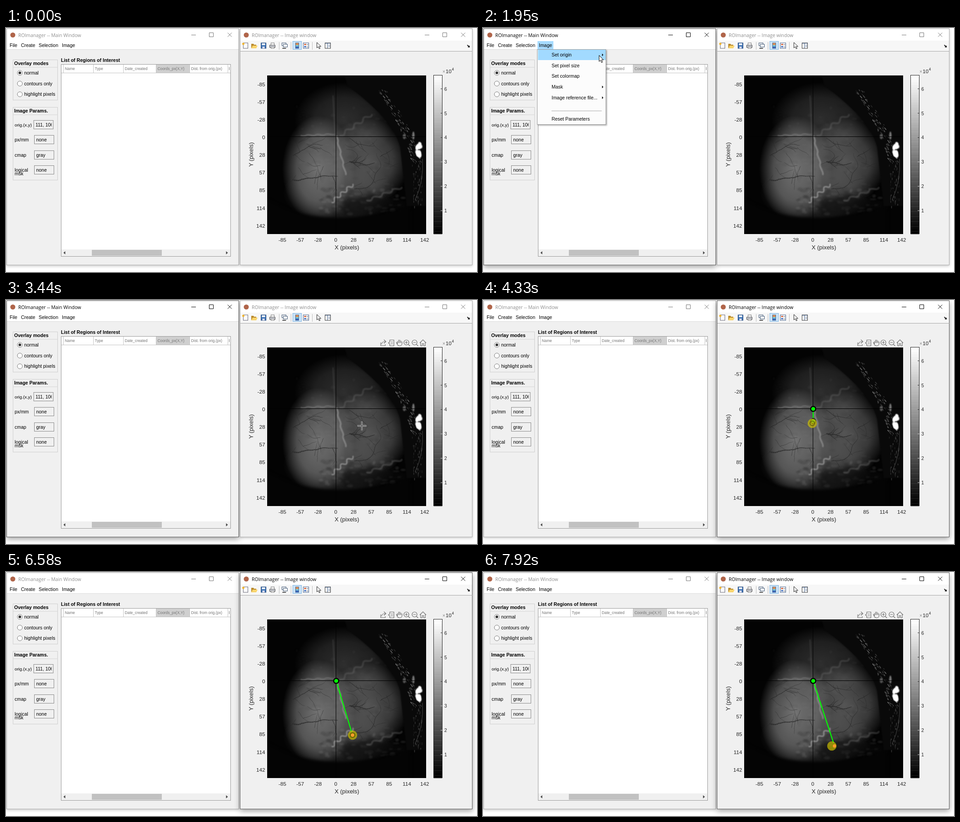
An HTML page with a canvas for the animation above (7990 ms loop, 1037 by 540 pixels).

```html
<!DOCTYPE html>
<html lang="en">
<head>
<meta charset="utf-8">
<title>ROImanager</title>
<style>
html, body { margin: 0; width: 100%; height: 100%; overflow: hidden; background: #fff; }
svg, canvas { position: absolute; left: 0; top: 0; }
#photo { left: 575px; top: 105px; }
text { font: 10.45px "Liberation Sans", Arial, sans-serif; white-space: pre; }
.title { font: 10.35px "Open Sans", "Noto Sans", sans-serif; fill: #8e8e8e; }
.bold { font-weight: bold; font-size: 10.55px; }
.head { font-size: 8.35px; fill: #747474; }
.tick { font-size: 11.7px; fill: #262626; }
.small { font-size: 10.5px; fill: #262626; }
.label { font-size: 13px; fill: #262626; }
.mid { text-anchor: middle; }
.end { text-anchor: end; }
.frame { filter: drop-shadow(0 2px 3px rgba(0,0,0,.22)); }
.edge { fill: none; stroke: #ababab; }
.buttons { fill: none; stroke: #777; }
.active .frame { filter: drop-shadow(0 4px 6px rgba(0,0,0,.38)); }
.active .edge { stroke: #5c5c5c; }
.active .title { fill: #000; }
.active .buttons { stroke: #000; }
.menu { filter: drop-shadow(2px 2px 1.5px rgba(0,0,0,.3)); }
</style>
</head>
<body>
<svg id="back" width="1037" height="540"></svg>
<canvas id="photo" width="350" height="351"></canvas>
<svg id="front" width="1037" height="540"></svg>
<script>
const LOOP = 7990, STEP = 70;
const back = document.getElementById('back'), front = document.getElementById('front');

function add(parent, tag, attrs, content) {
  const el = document.createElementNS('http://www.w3.org/2000/svg', tag);
  for (const k in attrs) el.setAttribute(k, attrs[k]);
  if (content !== undefined) el.textContent = content;
  parent.appendChild(el);
  return el;
}
const group = (p, cls) => add(p, 'g', { class: cls || '' });
const text = (p, x, y, s, cls, more) => add(p, 'text', { x, y, class: cls || '', ...more }, s);
const rect = (p, x, y, width, height, fill, stroke) =>
  add(p, 'rect', { x, y, width, height, fill: fill || 'none', stroke: stroke || 'none' });
const line = (p, d, stroke, w) =>
  add(p, 'path', { d, fill: 'none', stroke, 'stroke-width': w || 1 });
const shape = (p, d, fill, stroke) => add(p, 'path', { d, fill, stroke: stroke || 'none' });
const disk = (p, cx, cy, r, fill, stroke, w) =>
  add(p, 'circle', { cx, cy, r, fill: fill || 'none', stroke: stroke || 'none', 'stroke-width': w || 1 });
const show = (el, on) => el.setAttribute('display', on ? 'inline' : 'none');
const place = (el, x, y) => el.setAttribute('transform', `translate(${x} ${y})`);

// ---- windows ----
function makeWindow(x, title, barHeight, barFill) {
  const g = group(back), r = x + 512;
  add(g, 'rect', { class: 'frame', x, y: 1, width: 512, height: 524, fill: '#f0f0f0' });
  rect(g, x, 1, 512, 27, '#fff');
  rect(g, x, 28, 512, barHeight, barFill);
  disk(g, x + 14, 15.5, 5.5, '#b0654a');
  text(g, x + 26, 19.5, title, 'title');
  add(g, 'path', {
    class: 'buttons',
    d: `M${r - 105} 15.5h10M${r - 65.5} 10.5h9v9h-9zM${r - 25} 10.5l9 9m0-9l-9 9`
  });
  add(g, 'rect', { class: 'edge', x: x + .5, y: 1.5, width: 511, height: 523 });
  return g;
}
const mainWin = makeWindow(1, 'ROImanager -- Main Window', 19, '#fff');
const imageWin = makeWindow(515, 'ROImanager -- Image window', 23, '#f7f7f7');

// ---- main window ----
const menuMark = rect(mainWin, 120, 29, 35, 18, '#a6dbff');
const menuBar = { File: 8, Create: 33, Selection: 72, Image: 123 };
for (const s in menuBar) text(mainWin, menuBar[s], 41.5, s);
line(mainWin, 'M2 47.5H512', '#dcdcdc');

function panel(y, h, title) {
  rect(mainWin, 15.5, y + .5, 98, h, 'none', '#cfcfcf');
  line(mainWin, `M16 ${y + 17}H113`, '#d4d4d4');
  text(mainWin, 18, y + 12, title, 'bold');
}
panel(70, 89, 'Overlay modes');
['normal', 'contours only', 'highlight pixels'].forEach((s, i) => {
  const y = 99.3 + i * 23.7;
  disk(mainWin, 30.5, y, 5.5, '#fff', '#777');
  if (!i) disk(mainWin, 30.5, y, 3, '#333');
  text(mainWin, 40, y + 3.5, s);
});
panel(175, 161, 'Image Params.');
add(add(back, 'clipPath', { id: 'field' }), 'rect', { x: 61, y: 200, width: 39.5, height: 130 });
[['orig.(x,y)', '111, 106'], ['px/mm', 'none'], ['cmap', 'gray'], ['logical', 'none']].forEach(([name, value], i) => {
  const y = 204 + i * 33.3, x = i ? 62 : 60.5;
  text(mainWin, 19, Math.round(y) + 13.5, name, '', i ? {} : { style: 'font-size:9.7px' });
  rect(mainWin, x + .5, Math.round(y) + .5, 43, 19, '#f0f0f0', '#8a8a8a');
  text(mainWin, x + 4.5, Math.round(y) + 13.5, value, '', { 'clip-path': 'url(#field)' });
});
text(mainWin, 19, 326, 'msk');

text(mainWin, 121, 74.5, 'List of Regions of Interest', 'bold');
rect(mainWin, 121.5, 80.5, 373, 425, '#fff', '#9a9a9a');
rect(mainWin, 330, 81, 74, 18, '#cfcfcf');
line(mainWin, 'M122 99.5H494M488.5 81V99', '#c4c4c4');
const columns = { 'Name': 126, 'Type': 192, 'Date_created': 258, 'Coords_px(X,Y)': 330, 'Dist. from orig.(px)': 404 };
for (const s in columns) {
  line(mainWin, `M${columns[s] + .5} 81V99`, '#c4c4c4');
  text(mainWin, columns[s] + 3.5, 92.5, s, 'head');
}
line(mainWin, 'M491.5 86.5V93', '#777');
rect(mainWin, 122, 490, 372, 15, '#f0f0f0');
rect(mainWin, 189, 491, 154, 13, '#c1c1c1');
shape(mainWin, 'M126.5 497.5l4-3.5v7zM488.5 497.5l-4-3.5v7z', '#444');

// ---- image window toolbar ----
const ARROW = 'M.5.5V14l3.1-2.8 2.2 5.2 2.3-1-2.2-5H10z';
line(imageWin, 'M516 51.5H1027', '#a5a5a5');
[601, 627, 674].forEach(x => line(imageWin, `M${x}.5 31V48`, '#bdbdbd'));
rect(imageWin, 631.5, 29.5, 19, 18, '#cce4f7', '#7eb4e2');
function icon(x, draw) {
  const g = group(imageWin);
  place(g, x, 39);
  draw(g);
}
icon(526.5, g => {
  rect(g, -4, -6, 10, 12, '#fff', '#667');
  disk(g, -4, -4, 2.5, '#f2b632');
});
icon(546, g => {
  shape(g, 'M-6-4h5l1 2h5v8h-11z', '#b98a2c');
  shape(g, 'M-3 0H8L5 6H-6z', '#f9d56e');
});
icon(566.5, g => {
  rect(g, -5, -6, 11, 12, '#3f74b5', '#24487c');
  rect(g, -3, -5, 7, 4, '#fff');
  rect(g, -2, 2, 5, 4, '#dde');
});
icon(586.5, g => {
  rect(g, -3, -6, 7, 6, '#fff', '#777');
  rect(g, -6, -1, 12, 5, '#c9ccd4', '#555');
  rect(g, -3, 3, 7, 3, '#fff', '#777');
});
icon(613.5, g => {
  [-6, -3].forEach(k => rect(g, k, k, 9, 6, '#fff', '#3c5472'));
  line(g, 'M-5 6h8', '#555', 2);
});
icon(640.5, g => {
  rect(g, -3, -6, 7, 12, '#78c8d8', '#44618a');
  rect(g, -2.5, -5.5, 6, 4, '#e58b4b');
  rect(g, -2.5, 2, 6, 4, '#3b66b8');
});
icon(660.5, g => {
  rect(g, -6, -6, 12, 12, '#fff', '#44618a');
  rect(g, -4, -4, 4, 3, '#d6613b');
  rect(g, -4, 1, 4, 3, '#3b66b8');
  line(g, 'M1-2h4M1 3h4', '#555');
});
icon(684.5, g => shape(g, 'M0-7v12l3-2.6 2 4.6 2-.8-2-4.4h4z', '#fff', '#222'));
icon(708.5, g => {
  rect(g, -6, -6, 12, 12, '#fff', '#333');
  line(g, 'M-6-5h12M-1-5v11M1-1h4M1 2h4', '#44618a');
});
icon(1019, g => shape(g, 'M-3-2l4 3 1-2v5h-5l2-1-3-4z', '#222'));

// ---- axes and colour bar ----
const ticks = Array.from({ length: 9 }, (_, i) => i - 3);
for (const k of ticks) {
  const value = Math.round(k * 28.4);
  text(imageWin, 726 + k * 39.15, 472.5, value, 'tick mid');
  text(imageWin, 570.5, 246 + k * 39.15, value, 'tick end');
}
text(imageWin, 750.5, 489.5, 'X (pixels)', 'label mid');
text(imageWin, 0, 0, 'Y (pixels)', 'label mid', { transform: 'translate(543.5 280) rotate(-90)' });
for (let i = 0; i < 64; i++) {
  const v = Math.round(255 * (1 - i / 63));
  rect(imageWin, 942, 104 + i * 5.5, 18, 5.8, `rgb(${v},${v},${v})`);
}
rect(imageWin, 941.5, 104.5, 19, 351, 'none', '#262626');
for (let n = 1; n <= 6; n++) {
  text(imageWin, 965, 462 - n * 53.9, n, 'small');
  line(imageWin, `M957 ${458 - n * 53.9}h3.5`, n > 3 ? '#333' : '#ddd');
}
text(imageWin, 961, 99.5, '×', 'small', { style: 'fill:#888' });
text(imageWin, 968, 99.5, '10', 'small', { style: 'font-size:11.5px' });
text(imageWin, 981.5, 93.5, '4', 'small', { style: 'font-size:8.5px' });

// ---- camera picture: soft tones, wandering vessels ----
function paintPhoto() {
  const g = document.getElementById('photo').getContext('2d');
  let seed = 11;
  const rnd = () => (seed = seed * 16807 % 2147483647) / 2147483647;
  const span = (a, b) => a + (b - a) * rnd();
  const gray = (v, a) => `rgba(${v},${v},${v},${a})`;
  const blur = n => { g.filter = n ? `blur(${n}px)` : 'none'; };
  function glow(x, y, rx, ry, v, a) {
    g.save();
    g.translate(x, y);
    g.scale(rx, ry);
    const s = g.createRadialGradient(0, 0, 0, 0, 0, 1);
    s.addColorStop(0, gray(v, a));
    s.addColorStop(.6, gray(v, a * .65));
    s.addColorStop(1, gray(v, 0));
    g.fillStyle = s;
    g.fillRect(-1, -1, 2, 2);
    g.restore();
  }
  function oval(x, y, rx, ry, fill) {
    g.beginPath();
    g.ellipse(x, y, rx, ry, 0, 0, 7);
    g.fillStyle = fill;
    g.fill();
  }
  function stroke(path, width, color) {
    g.lineWidth = width;
    g.strokeStyle = color;
    g.stroke(new Path2D(path));
  }
  function vessel(x, y, a, len, width) {
    for (let d = 0; d < len; d += 4) {
      const px = x, py = y;
      a += span(-.3, .3);
      x += 4 * Math.cos(a);
      y += 4 * Math.sin(a);
      stroke(`M${px} ${py}L${x} ${y}`, width * (1 - .5 * d / len), gray(40, .5));
      if (width > 1 && rnd() < .13) vessel(x, y, a + (rnd() < .5 ? .9 : -.9), len * .35, width * .5);
    }
  }
  function ripple(x0, y0, x1, y1, size, width, color) {
    let d = '';
    for (let u = 0; u <= 1; u += .02) {
      const s = size * Math.sin(u * 22);
      d += `${d ? 'L' : 'M'}${x0 + (x1 - x0) * u + s} ${y0 + (y1 - y0) * u + s}`;
    }
    stroke(d, width, color);
  }
  g.translate(-575, -105);
  g.lineCap = g.lineJoin = 'round';
  g.fillStyle = '#030303';
  g.fillRect(575, 105, 350, 351);

  glow(745, 205, 110, 85, 75, .6);
  glow(688, 312, 80, 118, 160, .72);
  glow(795, 295, 95, 95, 140, .6);
  glow(735, 365, 125, 70, 105, .5);
  blur(1.5);
  for (let i = 0; i < 260; i++) {
    const low = i % 2;
    oval(span(low ? 690 : 640, 875), low ? span(350, 412) : span(170, 350),
      span(2, 8), span(1, 4), gray(rnd() < .4 ? 150 : 20, low ? .16 : .06));
  }
  blur(4);
  g.fillStyle = gray(12, .55);
  g.fill(new Path2D('M745 384L800 368L885 388V400L740 415z'));
  stroke('M736 250Q752 300 750 345', 9, gray(70, .4));

  blur(.6);
  [[632, 336, .25, 100, 2.8], [757, 296, .05, 56, 3], [632, 282, -.6, 70, 1.8],
   [756, 244, .5, 60, 1.6], [768, 356, -.2, 84, 1.8], [824, 285, -.6, 45, 1.6]].forEach(v => vessel(...v));
  for (let i = 0; i < 30; i++)
    vessel(i % 2 ? span(635, 700) : span(762, 845), span(250, 345), span(0, 6.3), 32, .9);

  blur(1);
  ripple(650, 238, 724, 235, 1, 3, gray(150, .4));
  ripple(728, 240, 748, 325, 1.5, 3.5, gray(175, .5));
  ripple(764, 346, 716, 386, 2.5, 2.8, gray(185, .6));
  ripple(736, 238, 806, 190, 2.5, 4, gray(140, .22));
  ripple(795, 382, 872, 352, 2, 4, gray(150, .25));
  stroke('M720 150L724 240', 2, gray(95, .4));

  // dark rim with glints outside it
  blur(3);
  g.fillStyle = '#040404';
  g.fill(new Path2D('M620 402Q735 442 890 394V456H575V380z'));
  blur(1);
  g.fillStyle = '#090909';
  g.fill(new Path2D('M752 128Q855 205 868 265L882 394H925V105H745z'));
  blur(.4);
  for (let i = 0; i < 190; i++) {
    const u = rnd(), low = u > .62;
    const x = 828 + 80 * Math.sin(Math.min(1.5, u * 2)) + span(-11, 9), y = 135 + 260 * u, s = span(1, 4);
    stroke(`M${x} ${y}l${low ? 0 : s} ${s * 1.2}`, span(.7, 2), gray(span(30, low ? 90 : 165), .6));
  }
  stroke('M917 290Q920 340 901 380', 1, gray(100, .7));
  blur(1.2);
  for (let i = 0; i < 24; i++) oval(span(904, 914), span(254, 284), 3, 4, '#fff');
  oval(897, 238, 2.5, 9, gray(170, .7));
  oval(877, 240, 3.5, 6, gray(120, .7));
  blur(0);
  g.fillStyle = '#000';
  g.fillRect(575, 240, 350, 1);
  g.fillRect(726, 105, 1, 351);
}
paintPhoto();

// ---- hover tools over the axes ----
const hoverTools = group(front);
line(hoverTools, [
  'M825 94v7h10v-3M827 98c0-4 3-6 8-6M832 88l4.5 4-4.5 4',
  'M845 88.5h9v13h-9v-4l-3-2.5 3-2.5zM847 93h5M847 97h5',
  'M862 96l-3-2.5M862 97v-6M864.5 95v-7M867 95v-7M869.5 95v-5M872 92v4c0 3-2 5.5-5 5.5-4 0-5-2-7-6',
  'M885.5 98l4 4M878.5 94h6M881.5 91v6M903.5 98l4 4M896.5 94h6',
  'M911 95l7-7 7 7M913 94v7.5h3.5v-5h3v5h3.5v-7.5'
].join(''), '#6e6e6e', 1.2);
[881.5, 899.5].forEach(x => disk(hoverTools, x, 94, 5.5, 'none', '#6e6e6e', 1.2));

// ---- drawn line ----
const roi = group(front);
const roiLine = line(roi, '', '#0f0', 2.2);
const endRing = disk(roi, 0, 0, 5.5, 'none', '#1c2a10', 2);
const endFill = disk(roi, 0, 0, 4, '#3c3');
disk(roi, 727, 241, 5.5, '#0f0', '#000', 2.4);
const press = disk(roi, 0, 0, 10.3, 'rgba(205,192,0,.68)');
const pressRing = disk(roi, 0, 0, 5, 'none', 'rgba(70,66,0,.6)', 2);
const hotDot = disk(roi, 0, 0, 3.7, '#ff9c2c');

// ---- menus ----
const menu = group(front, 'menu'), submenu = group(front, 'menu');
const rowY = i => 63 + i * 23.7;
rect(menu, 119.5, 47.5, 151, 166, '#fcfcfc', '#9c9c9c');
const originMark = rect(menu, 121, 48, 149, 23, '#a2daff');
['Set origin', 'Set pixel size', 'Set colormap', 'Mask', 'Image reference file...', '_'.repeat(19), 'Reset Parameters']
  .forEach((s, i) => text(menu, 151, rowY(i), s, '', s[0] === '_' ? { fill: '#888' } : {}));
[0, 3, 4].forEach(i => shape(menu, `M262 ${rowY(i) - 6.5}l3 3-3 3z`, '#111'));
rect(submenu, 270.5, 47.5, 135, 72, '#fcfcfc', '#9c9c9c');
const subMark = rect(submenu, 271.5, 0, 133, 23, '#a2daff', '#2b8fd6');
['New', 'Import from file...', 'Align image to origin'].forEach((s, i) => text(submenu, 301, rowY(i), s));

// ---- pointers ----
const arrow = shape(front, ARROW, '#fff', '#000');
const cross = group(front);
line(cross, 'M-10 0H10M0-10V10', '#fff', 2.4);
line(cross, 'M-10 0H10M0-10V10', '#111');

// start, end, and the place reached by then
const moves = [
  [0, 0, 760, 545], [240, 500, 225, 322], [570, 790, 136, 16], [990, 1340, 139, 38],
  [1740, 2000, 260, 61], [2070, 2490, 360, 106], [2560, 2560, 359, 103],
  [3020, 3220, 826, 285], [3370, 3860, 727, 268], [4330, 4330, 725, 273],
  [4400, 4960, 784, 399], [5090, 5630, 768, 371], [6040, 6250, 763, 361],
  [6780, 7190, 764, 385], [7450, 7720, 774, 385], [7920, 7920, 768, 385]
];
function pointer(t) {
  const i = moves.findLastIndex(m => t >= m[0]);
  const [start, end, x, y] = moves[i];
  const [, , fromX, fromY] = moves[Math.max(0, i - 1)];
  const count = Math.round((end - start) / STEP) + 1;
  const f = Math.min(1, (Math.floor((t - start) / STEP) + 1) / count);
  const k = 1 - (1 - f) ** 2;
  return [fromX + (x - fromX) * k, fromY + (y - fromY) * k];
}

const CLICK = 1480, PICK = 3020, PRESS = 4190, HOT = 5230;
function draw(t) {
  const [x, y] = pointer(t);
  const menuOpen = t >= CLICK && t < PICK, drawing = t >= PRESS;
  const overAxes = x > 575 && x < 925 && y > 105 && y < 456;
  const aiming = t >= PICK && !drawing && overAxes;
  mainWin.setAttribute('class', t >= CLICK && !drawing ? 'active' : '');
  imageWin.setAttribute('class', drawing ? 'active' : '');
  show(menuMark, menuOpen);
  show(menu, menuOpen);
  show(originMark, y > 47);
  show(submenu, menuOpen && t >= 2000);
  show(subMark, x > 271);
  subMark.setAttribute('y', 48 + 23.7 * Math.min(2, Math.max(0, Math.floor((y - 48) / 23.7))));
  show(hoverTools, overAxes);
  show(arrow, !drawing && !aiming);
  show(cross, aiming);
  place(arrow, x, y);
  place(cross, Math.round(x) + .5, Math.round(y) + .5);
  show(roi, drawing);
  if (drawing) drawLine(t, x, y);
}

// The line's end trails the pointer by one step.
function drawLine(t, x, y) {
  const [ex, ey] = pointer(t - STEP);
  const dx = ex - 727, dy = ey - 241, cut = 1 - 7 / Math.hypot(dx, dy);
  roiLine.setAttribute('d', `M727 241L${727 + dx * cut} ${241 + dy * cut}`);
  [endRing, endFill, hotDot].forEach(el => place(el, ex, ey));
  [press, pressRing].forEach(el => place(el, x, y));
  show(pressRing, Math.hypot(ex - x, ey - y) < 6);
  show(endFill, t < HOT);
  show(hotDot, t >= HOT);
}

function tick() {
  draw(performance.now() % LOOP);
  requestAnimationFrame(tick);
}
tick();
</script>
</body>
</html>
```
